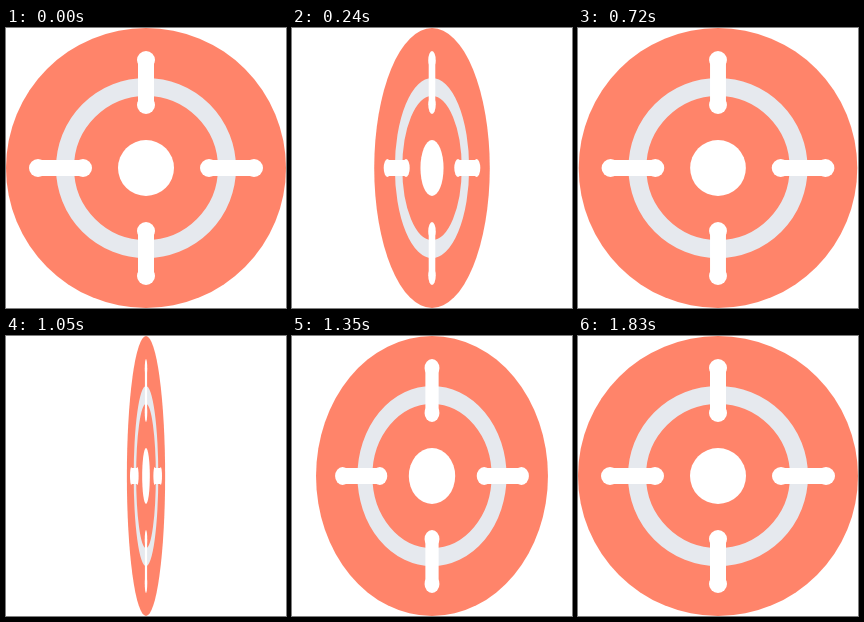
Write an HTML page that moves like this. It is 280 px wide and 280 px high and loops after 1860 ms.

```html
<!DOCTYPE html>
<html lang="en">
<head>
<meta charset="utf-8">
<title>Spinning target</title>
<style>
  html, body { margin: 0; width: 100%; height: 100%; overflow: hidden; background: #fff; }
  svg { display: block; width: 100vw; height: 100vh; }
</style>
</head>
<body>
<svg viewBox="-140 -140 280 280">
  <defs>
    <g id="bar" fill="#fff">
      <path d="M-8-108H8V-63H-8z"/>
      <circle cy="-108" r="9"/>
      <circle cy="-63" r="9"/>
    </g>
  </defs>
  <g id="coin">
    <circle r="140" fill="#ff846a"/>
    <circle r="81" fill="none" stroke="#e6e9ee" stroke-width="18"/>
    <circle r="28" fill="#fff"/>
    <use href="#bar"/>
    <use href="#bar" transform="rotate(90)"/>
    <use href="#bar" transform="rotate(180)"/>
    <use href="#bar" transform="rotate(270)"/>
  </g>
</svg>
<script>
const STEP = 30, HALF_TURN = 930;
const coin = document.getElementById('coin');

// cubic-bezier(0, .515, .5, 1), solved by bisection
function easeOut(x) {
  let lo = 0, hi = 1;
  for (let i = 0; i < 30; i++) {
    const s = (lo + hi) / 2;
    if (1.5 * s * s - 0.5 * s ** 3 < x) lo = s; else hi = s;
  }
  const r = 1 - lo;
  return 1.545 * lo * r * r + 3 * lo * lo * r + lo ** 3;
}

function draw(now) {
  const time = Math.floor(now / STEP) * STEP % HALF_TURN;
  const width = Math.abs(Math.cos(Math.PI * easeOut(time / HALF_TURN)));
  coin.setAttribute('transform', `scale(${width.toFixed(5)} 1)`);
}

const start = performance.now();
function tick() {
  draw(performance.now() - start);
  requestAnimationFrame(tick);
}
tick();
</script>
</body>
</html>
```
